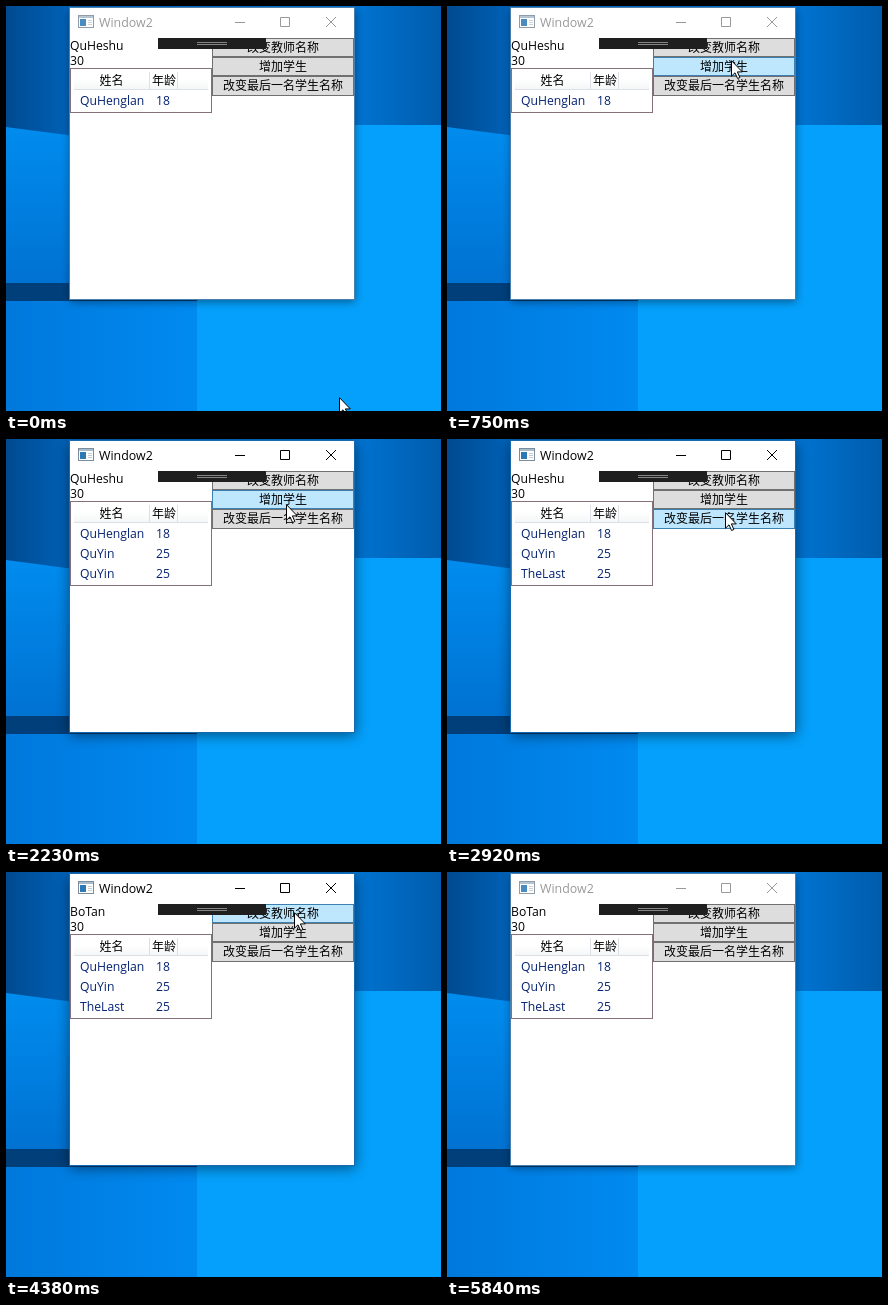
Recreate the animation shown at these times as an HTML page. Size 435x405 px, loop 5.92 s.

```html
<!DOCTYPE html>
<html lang="zh">
<head>
<meta charset="utf-8">
<title>Window2</title>
<style>
  html, body { margin: 0; width: 100%; height: 100%; overflow: hidden; }
  svg { display: block; width: 435px; height: 405px; }
  text { font: 12.2px "Open Sans", "Noto Sans CJK SC", "Noto Sans CJK", sans-serif; }
  .cjk { font: 12px "Noto Sans CJK SC", "Noto Sans CJK", sans-serif; text-anchor: middle; }
  .row { fill: #042271; }
  #title { font-size: 12.4px; }
</style>
</head>
<body>
<svg viewBox="0 0 435 405">
  <defs>
    <linearGradient id="dusk">
      <stop offset="0" stop-color="#004a90"/>
      <stop offset=".15" stop-color="#0062b8"/>
      <stop offset=".8" stop-color="#0074d2"/>
      <stop offset="1" stop-color="#005cac"/>
    </linearGradient>
    <linearGradient id="beam" x2="0" y2="1">
      <stop offset="0" stop-color="#008cee"/>
      <stop offset="1" stop-color="#0072d2"/>
    </linearGradient>
    <linearGradient id="floor">
      <stop offset="0" stop-color="#0078dc"/>
      <stop offset="1" stop-color="#008af0"/>
    </linearGradient>
    <linearGradient id="sheen" x2="0" y2="1">
      <stop offset=".4" stop-color="#fff"/>
      <stop offset="1" stop-color="#f5f6f7"/>
    </linearGradient>
    <filter id="blur" x="-20%" y="-20%" width="140%" height="140%">
      <feGaussianBlur id="softness"/>
    </filter>
  </defs>

  <rect width="435" height="405" fill="url(#dusk)"/>
  <path d="M0 121L191 146V277H0Z" fill="url(#beam)"/>
  <rect y="277" width="191" height="18" fill="#003f7a"/>
  <rect y="295" width="191" height="110" fill="url(#floor)"/>
  <rect x="191" y="119" width="290" height="290" fill="#05a0fb"/>

  <rect id="shadow" x="64" y="5" width="285" height="291" filter="url(#blur)"/>
  <rect id="frame" x="63.5" y="1.5" width="285" height="292" fill="#fff"/>

  <g id="icon">
    <rect x="72.5" y="9.5" width="15" height="12" fill="#fff" stroke="#7d8c99"/>
    <rect x="73" y="10" width="14" height="2" fill="#a9bccb"/>
    <rect x="74" y="13" width="6" height="7" fill="#2b79b5"/>
    <path d="M82 14.5h4M82 16.5h4M82 18.5h4" stroke="#c3ccd3"/>
  </g>
  <text id="title" x="93" y="21">Window2</text>
  <path id="controls" fill="none"
    d="M229 16.5h10M274.5 11.5h9v9h-9zM320 11l10 10M330 11l-10 10"/>

  <text id="teacher" x="64" y="44"></text>
  <text x="64" y="59">30</text>

  <rect id="list" x="64.5" y="62.5" width="141" fill="#fff" stroke="#85717c"/>
  <rect x="68" y="66" width="134" height="17" fill="url(#sheen)"/>
  <path d="M68 83.5h134M143.5 66v17M171.5 66v17" stroke="#dcdfe4" fill="none"/>
  <text class="cjk" x="105.5" y="79">姓名</text>
  <text class="cjk" x="158" y="79">年龄</text>
  <g id="rows"></g>
  <g id="buttons"></g>

  <rect x="152" y="32" width="108" height="11" fill="#1f1f1f"/>
  <path d="M191 36.5h30M191 38.5h30" stroke="#858585"/>

  <path id="cursor" fill="#fff" stroke="#000"
    d="M.5 .7V16.2L4 12.8L6.6 18.5L8.9 17.5L6.4 11.9H11.3Z"/>
</svg>
<script>
const LOOP = 5920;
const STEP = 76; // the screen refreshes about 13 times a second
const SVG = "http://www.w3.org/2000/svg";
const $ = id => document.getElementById(id);

function set(el, attrs) {
  for (const key in attrs) el.setAttribute(key, attrs[key]);
}

function add(parent, tag, attrs, text = "") {
  const el = document.createElementNS(SVG, tag);
  set(el, attrs);
  el.textContent = text;
  return parent.appendChild(el);
}

// Three buttons share 58 pixels, snapped to whole pixels.
const buttonTop = i => 32 + Math.floor(58 * i / 3);
const buttons = ["改变教师名称", "增加学生", "改变最后一名学生名称"].map((label, i) => {
  const top = buttonTop(i), bottom = buttonTop(i + 1);
  const box = add($("buttons"), "rect", { x: 206.5, y: top + .5, width: 141, height: bottom - top - 1 });
  add($("buttons"), "text", { class: "cjk", x: 277, y: Math.round((top + bottom) / 2 + 4) }, label);
  return { top, bottom, box };
});

const rows = [["QuHenglan", 18], ["QuYin", 25], ["QuYin", 25]].map(([name, age], i) => {
  const group = add($("rows"), "g", { class: "row" });
  const y = 99 + 20 * i;
  const label = add(group, "text", { x: 74, y }, name);
  add(group, "text", { x: 150, y }, age);
  return { group, label };
});

const clicks = { addFirst: 1210, addSecond: 1840, renameLast: 2840, renameTeacher: 4150 };
const released = click => click + STEP;

const home = { x: 333, y: 391 };
const moves = [
  { start: 0, end: 290, x: 280, y: 64 },
  { start: 290, end: 600, x: 284, y: 54 },
  { start: 2005, end: 2380, x: 278, y: 73 },
  { start: 3300, end: 3540, x: 288, y: 40 },
  { start: 4380, end: 4690, x: 290, y: 68 },
  { start: 4690, end: 4840, x: 295, y: 135 },
  { start: 4840, end: 5300, x: 409, y: 398 },
  { start: 5300, end: 5460, x: 417, y: 405 }
];

function pointerAt(t) {
  let { x, y } = home;
  for (const move of moves) {
    if (t < move.start) break;
    const span = move.end - move.start;
    const steps = Math.round(span / STEP);
    const progress = Math.min(Math.floor((t - move.start) / span * steps) / steps, 1);
    x += (move.x - x) * progress;
    y += (move.y - y) * progress;
  }
  return [Math.round(x), Math.round(y)];
}

function draw(t) {
  const [x, y] = pointerAt(t);
  const active = t >= clicks.addFirst && t < 5840;
  const pressed = Object.values(clicks).some(c => t >= c && t < released(c));
  const ink = active ? "#000" : "#999";

  set($("cursor"), { transform: `translate(${x} ${y})` });
  set($("title"), { fill: ink });
  set($("controls"), { stroke: ink });
  set($("icon"), { opacity: active ? 1 : .85 });
  set($("frame"), { stroke: active ? "#1769b0" : "#4b7fae" });
  set($("softness"), { stdDeviation: active ? 7 : 4 });
  set($("shadow"), { opacity: active ? .5 : .4 });

  for (const { top, bottom, box } of buttons) {
    const hover = x >= 206 && x < 348 && y >= top && y < bottom;
    set(box, {
      fill: !hover ? "#ddd" : pressed ? "#c4e5f6" : "#bee6fd",
      stroke: !hover ? "#707070" : pressed ? "#2c628b" : "#3c7fb1"
    });
  }

  const count = 1 + (t >= released(clicks.addFirst)) + (t >= released(clicks.addSecond));
  rows.forEach((row, i) => set(row.group, { visibility: i < count ? "visible" : "hidden" }));
  set($("list"), { height: 24 + 20 * count });
  rows[2].label.textContent = t >= released(clicks.renameLast) ? "TheLast" : "QuYin";
  $("teacher").textContent = t >= released(clicks.renameTeacher) ? "BoTan" : "QuHeshu";
}

const begin = performance.now();
function tick() {
  draw((performance.now() - begin) % LOOP);
  requestAnimationFrame(tick);
}
tick();
</script>
</body>
</html>
```
